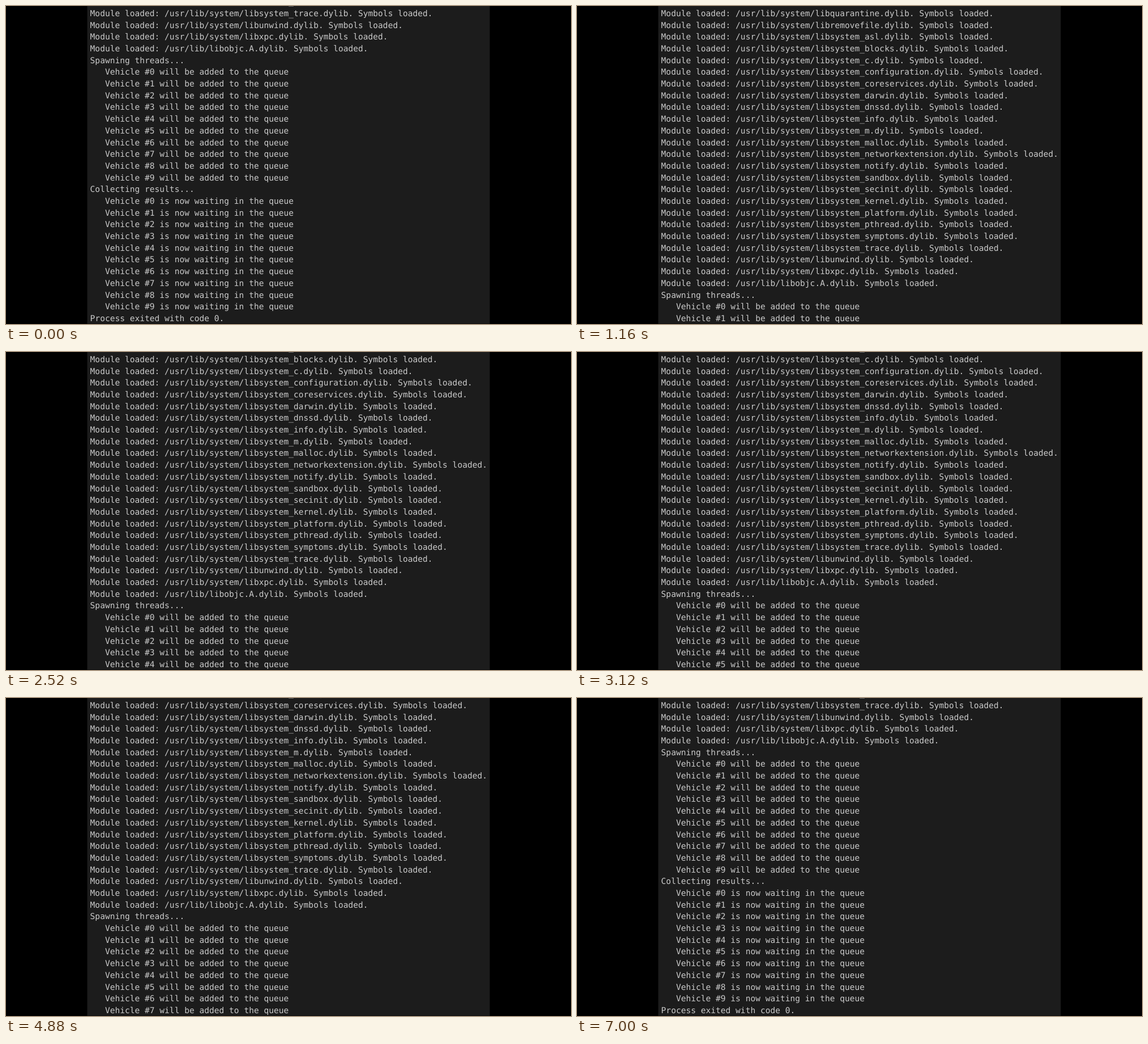
Animation of 998 by 561 pixels, one loop 8000 ms. Source, as an HTML page:

```html
<!DOCTYPE html>
<html lang="en">
<head>
<meta charset="utf-8">
<title>Console output</title>
<style>
  html, body { margin: 0; width: 100%; height: 100%; overflow: hidden; background: #000; }
  svg { display: block; width: 998px; height: 561px; }
  text {
    font: 14.575px "DejaVu Sans Mono", "Liberation Mono", monospace;
    fill: #cacaca;
    white-space: pre;
    text-rendering: geometricPrecision;
  }
</style>
</head>
<body>
<svg viewBox="0 0 998 561">
  <rect x="143.5" width="711" height="560.5" fill="#1c1c1c"/>
  <g id="rows"></g>
</svg>
<script>
const LOOP = 8000;
const ROWS = 28;
const PITCH = 20.69;
const LEFT = 148.6;
const LAST_BASELINE = 555.9;

const START = 40;
const FIRST_VEHICLE = 120;
const VEHICLE_STEP = 600;
const RESULTS = 6160;
const VEHICLES = 10;

const systemParts = ("asl blocks c configuration coreservices darwin dnssd info m malloc " +
  "networkextension notify sandbox secinit kernel platform pthread symptoms trace").split(" ");

const modules = [
  ..."dyld keymgr launch macho quarantine removefile".split(" ").map(n => "system/lib" + n),
  ...systemParts.map(n => "system/libsystem_" + n),
  "system/libunwind", "system/libxpc", "libobjc.A"
].map(path => `Module loaded: /usr/lib/${path}.dylib. Symbols loaded.`);

const vehicleLines = ending =>
  Array.from({ length: VEHICLES }, (_, i) => `   Vehicle #${i} ${ending}`);

const lines = [
  ...modules,
  "Spawning threads...",
  ...vehicleLines("will be added to the queue"),
  "Collecting results...",
  ...vehicleLines("is now waiting in the queue"),
  "Process exited with code 0."
];

const rows = Array.from({ length: ROWS }, (_, i) => {
  const row = document.createElementNS("http://www.w3.org/2000/svg", "text");
  row.setAttribute("x", LEFT);
  row.setAttribute("y", LAST_BASELINE - (ROWS - 1 - i) * PITCH);
  row.setAttribute("xml:space", "preserve");
  return document.getElementById("rows").appendChild(row);
});

function lineCount(t) {
  if (t < START || t >= RESULTS) return lines.length;
  const added = Math.floor((t - FIRST_VEHICLE) / VEHICLE_STEP) + 1;
  return modules.length + 1 + Math.max(0, Math.min(VEHICLES, added));
}

let shown = 0;

function render(t) {
  const count = lineCount(t);
  if (count === shown) return;
  shown = count;
  rows.forEach((row, i) => {
    row.textContent = lines[count - ROWS + i] || "";
  });
}

const origin = performance.now();
function tick() {
  render((performance.now() - origin) % LOOP);
  requestAnimationFrame(tick);
}
tick();
</script>
</body>
</html>
```
